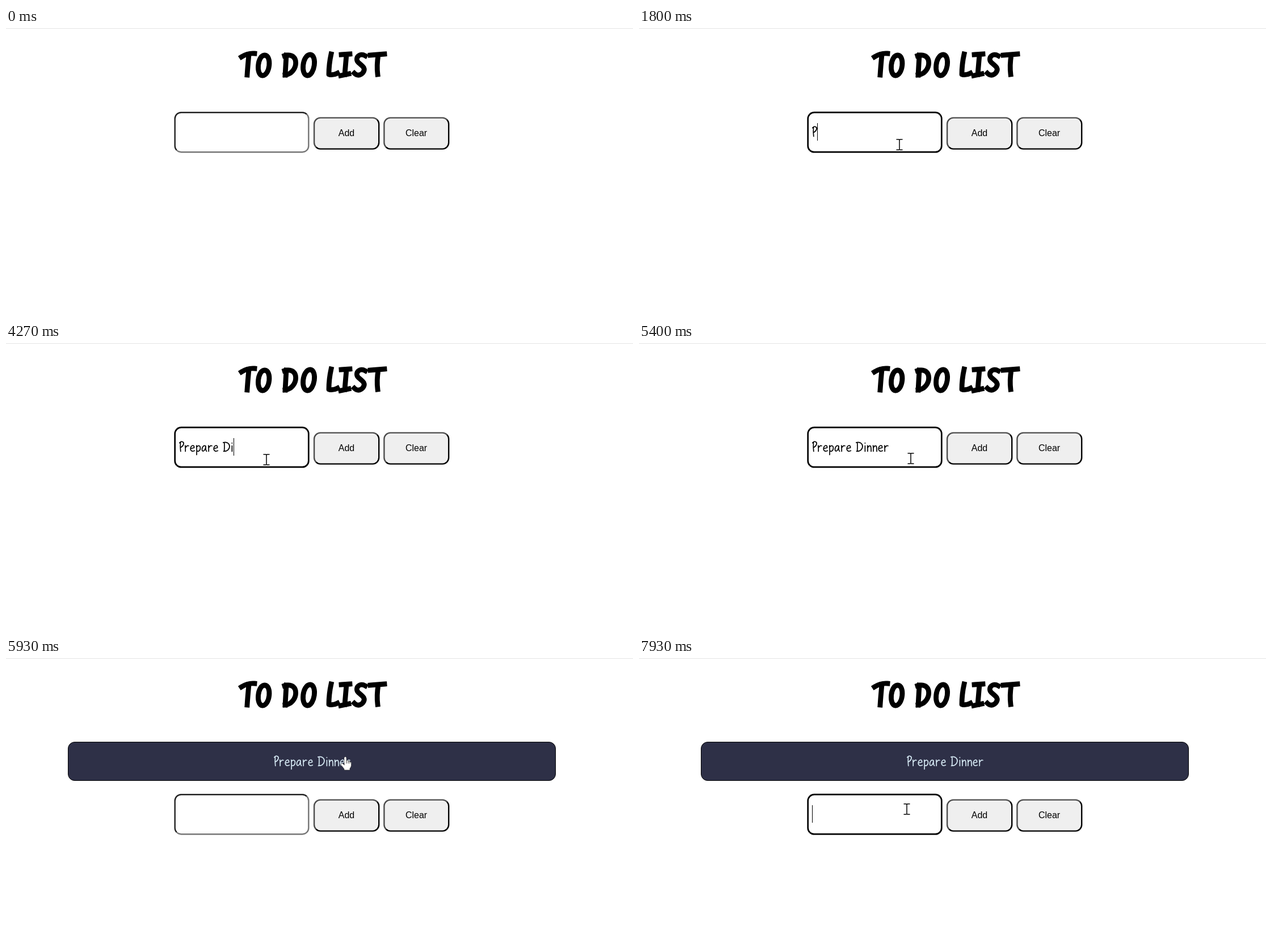
An HTML page for the animation above (8000 ms loop, 1105 by 507 pixels).

```html
<!DOCTYPE html>
<html lang="en">
<head>
<meta charset="utf-8">
<title>To do list</title>
<style>
  html, body { margin: 0; width: 100%; height: 100%; overflow: hidden; background: #fff; }
  #stage { position: relative; width: 1105px; height: 507px; overflow: hidden; border-top: 1px solid #e3e3e3; box-sizing: border-box; }
  #stage > *, #row > * { position: absolute; box-sizing: border-box; }
  #row { left: 0; top: -1px; width: 100%; height: 0; }
  #row.down { top: 91px; }
  h1 { left: 410px; top: 34px; width: 262px; margin: 0; text-align: center; font: bold 46px/60px "Open Sans", sans-serif; color: transparent; white-space: nowrap; }
  svg { left: 0; top: 0; width: 1px; height: 1px; overflow: visible; fill: none; stroke-linejoin: round; }
  #title { top: -1px; stroke: #000; stroke-width: 8.8; stroke-linecap: square; }
  .box { stroke-width: 2.4; }
  .box rect { fill: #efefef; }
  .box text { fill: #000; font: 16px "Liberation Sans", Arial, sans-serif; text-anchor: middle; }
  .box .lit { stroke: #4c4c4c; }
  .box .dim { stroke: #000; }
  .box.pressed .lit { stroke: #000; }
  .box.pressed .dim { stroke: #4c4c4c; }
  #field rect { fill: #fff; }
  #field .lit { stroke: #222; }
  #field .dim { stroke: #767676; }
  #stage .focus path { stroke: #000; stroke-width: 2.7; }
  #caret { top: 168px; width: 1px; height: 31px; background: #000; }
  #item { left: 109px; top: 147px; width: 860px; height: 69px; border: 1px solid #000; border-radius: 12px; background: #2e3047; }
  .hand { height: 30px; font: 20px/30px "Open Sans", sans-serif; color: transparent; white-space: pre; }
  .hand svg { position: absolute; stroke-width: 1.7; stroke-linecap: round; }
  #typed { left: 305px; top: 169px; stroke: #000; }
  #label { left: 472px; top: 166.5px; stroke: #d3e6f1; }
  #glow { left: -14px; top: -14px; width: 28px; height: 28px; border-radius: 50%; background: #fffd74; mix-blend-mode: multiply; }
  #pointer { top: -1px; }
  [hidden] { display: none !important; }
</style>
</head>
<body>
<div id="stage">
  <h1>TO DO LIST</h1>
  <svg id="title" aria-hidden="true">
    <path d="M415 51Q426 44 438 45M428 47Q426 68 425 83"/>
    <path d="M456 48C443 48 440 83 452 84C465 84 469 49 456 48Z"/>
    <path d="M494 48L492 83M491 49C518 41 516 80 492 83"/>
    <path d="M536 47C522 48 519 83 531 84C544 84 549 48 536 47Z"/>
    <path d="M573 46Q569 64 569 82Q576 84 584 80"/>
    <path d="M591 47L606 46M600 47L597 82M590 84L604 81"/>
    <path d="M633 49C622 43 614 54 621 61C628 67 635 71 629 79C624 85 618 84 614 80"/>
    <path d="M642 48Q655 47 667 46M656 48Q653 66 655 82"/>
  </svg>
  <div id="item"></div>
  <div id="label" class="hand"></div>
  <div id="row">
    <svg>
      <g id="field" class="box"></g>
      <g id="add" class="box"><text x="600" y="190.7">Add</text></g>
      <g id="clear" class="box"><text x="723" y="190.7">Clear</text></g>
    </svg>
    <div id="typed" class="hand"></div>
    <div id="caret"></div>
  </div>
  <svg id="pointer" aria-hidden="true">
    <path id="arrow" fill="#fff" stroke="#000" stroke-width="1" d="M.5.5V16.5L4.2 13L7 19.4L9.7 18.2L7 12H12Z"/>
    <path id="beam" stroke="#000" stroke-width="1.5" d="M-5.5-9.3H-1.5L0-8.5L1.5-9.3H5.5M0-9V9M-5.5 9.3H-1.5L0 8.5L1.5 9.3H5.5"/>
    <g id="palm" stroke="#222" stroke-linecap="round">
      <path fill="#fff" stroke-width=".6" d="M-2 2Q0-1.5 2 2V7Q4.5 6 5.4 8Q7.5 7.4 8.2 9.3Q10.3 9 10.5 11.5V16Q10 19 8 21V24H-2V22Q-6 17-8 14Q-7.5 11-4.5 12.5L-2 15Z"/>
      <path stroke-width=".9" d="M2 7V12M5.2 8V12M8 9.3V12"/>
    </g>
  </svg>
  <div id="glow"></div>
</div>
<script>
const LOOP = 8000, TEXT = "Prepare Dinner", DROP = 92;
const $ = id => document.getElementById(id);

// Letter: advance width and pen strokes, baseline at 0
const glyphs = {
  P: [9, "M2.5-16.5Q1.8-8 2.8-.5M.8-15.5C4-20 9-17 8-13.5Q7-9.5 3-7.5"],
  r: [10, "M1.8-11Q2.4-5 2.2-.5M2.2-6.5Q4.5-11.5 8-10.3"],
  e: [10, "M1.5-5.5L7.6-7Q7.8-11 5-11Q1.2-10 1.2-4.5Q2.2 1 8.3-1.8"],
  p: [10, "M1.8-11Q2.4-2 2 5.5M2-8Q5-12.5 8-9Q9.5-4 6-1.2Q4 0 2.2-2"],
  a: [11, "M8-9.8C4-13 1-7 1.5-3C2.5 1 7-1 8-9.5Q7.6-2 9.6-.7"],
  D: [14, "M2.8-16Q3.2-8 2.6-.7M.8-16.2C9-18 12.5-13 12-8.5C11-3 7-.6 1.5-.7"],
  i: [5, "M2.4-10.5V-.6M2.4-15.4V-15"],
  n: [10, "M1.6-11Q2.2-5 1.9-.6M1.9-6.5Q4.2-11.8 7-10Q8.2-8 8.1-.6"],
  " ": [7, ""]
};

// Time of each key press
const keys = [1800, 2200, 2400, 2860, 3060, 3320, 3390, 3790, 4070, 4270, 4470, 4600, 4670, 4800];

// Pointer moves: start, end, steps, then a cubic curve
const moves = [
  [140, 940, 12, 634, 345, 480, 120, 380, 90, 459, 206],
  [5330, 5800, 8, 459, 206, 500, 205, 560, 180, 598, 174],
  [7520, 7860, 6, 598, 174, 560, 190, 520, 255, 472, 267]
];
const clicks = [[940, 1010], [5800, 5930], [7860, 7930]];

const within = (t, a, b) => t >= a && t < b;
const smooth = u => u * u * (3 - 2 * u);
const show = (id, on) => { $(id).hidden = !on; };
const mark = (id, name, on) => $(id).classList.toggle(name, on);
const penAt = n => [...TEXT.slice(0, n)].reduce((x, c) => x + glyphs[c][0], 0);

// Rounded box whose border changes tone on the two diagonal corners
function addBox(id, x, y, w, h, r = 11) {
  const k = r * (1 - Math.SQRT1_2), right = x + w, bottom = y + h;
  const arc = (px, py) => `A${r} ${r} 0 0 1 ${px} ${py}`;
  const lit = `M${x + k} ${bottom - k}${arc(x, bottom - r)}V${y + r}${arc(x + r, y)}H${right - r}${arc(right - k, y + k)}`;
  const dim = `M${right - k} ${y + k}${arc(right, y + r)}V${bottom - r}${arc(right - r, bottom)}H${x + r}${arc(x + k, bottom - k)}`;
  $(id).insertAdjacentHTML("afterbegin",
    `<rect x="${x}" y="${y}" width="${w}" height="${h}" rx="${r}"/><path class="lit" d="${lit}"/><path class="dim" d="${dim}"/>`);
}

function write(el, n) {
  const strokes = [...TEXT.slice(0, n)].map((c, i) =>
    `<path transform="translate(${penAt(i)} 23)" d="${glyphs[c][1]}"/>`).join("");
  el.innerHTML = `<span>${TEXT.slice(0, n)}</span><svg aria-hidden="true">${strokes}</svg>`;
}

function pointerAt(t) {
  const m = moves.filter(m => t >= m[0]).pop();
  if (!m) return null;
  const [start, end, steps, ...p] = m;
  const step = Math.floor((t - start) / (end - start) * (steps - 1) + .001) + 1;
  const u = smooth(Math.min(1, step / steps)), v = 1 - u;
  const curve = k => v * v * v * p[k] + 3 * v * v * u * p[k + 2] + 3 * v * u * u * p[k + 4] + u * u * u * p[k + 6];
  return [curve(0), curve(1)];
}

function shapeAt([x, y], added) {
  const top = added ? 148 + DROP : 148;
  if (x > 297 && x < 534 && within(y, top, top + 72)) return "beam";
  return added && within(y, 148, 217) ? "palm" : "arrow";
}

let shown = -1;
function draw(t) {
  const added = t >= 5930;
  const count = added ? 0 : keys.filter(k => t >= k).length;
  if (count !== shown) {
    write($("typed"), count);
    $("caret").style.left = 305 + penAt(count) - (count ? .5 : 0) + "px";
    shown = count;
  }
  show("item", added);
  show("label", added);
  mark("row", "down", added);
  mark("field", "focus", within(t, 1010, 5870) || t >= 7930);
  mark("add", "pressed", within(t, 5870, 5930));
  mark("add", "focus", within(t, 6460, 7930));
  show("caret", within(t, 1010, 1470) || within(t, 1800, 5330) || t >= 7930);

  const pos = pointerAt(t);
  show("glow", clicks.some(c => within(t, ...c)));
  $("pointer").style.display = pos ? "" : "none";
  if (!pos) return;
  const shape = shapeAt(pos, added);
  for (const id of ["arrow", "beam", "palm"]) $(id).style.display = id === shape ? "" : "none";
  const [x, y] = pos.map(Math.round);
  $("pointer").style.transform = `translate(${x}px, ${y}px)`;
  $("glow").style.transform = `translate(${x}px, ${y - 1}px)`;
}

addBox("field", 297.7, 149.2, 235.6, 70);
addBox("add", 543.1, 158.6, 114.1, 55);
addBox("clear", 666.4, 158.6, 113.8, 55);
write($("label"), TEXT.length);

const begin = performance.now();
function tick() {
  draw((performance.now() - begin) % LOOP);
  requestAnimationFrame(tick);
}
tick();
</script>
</body>
</html>
```
